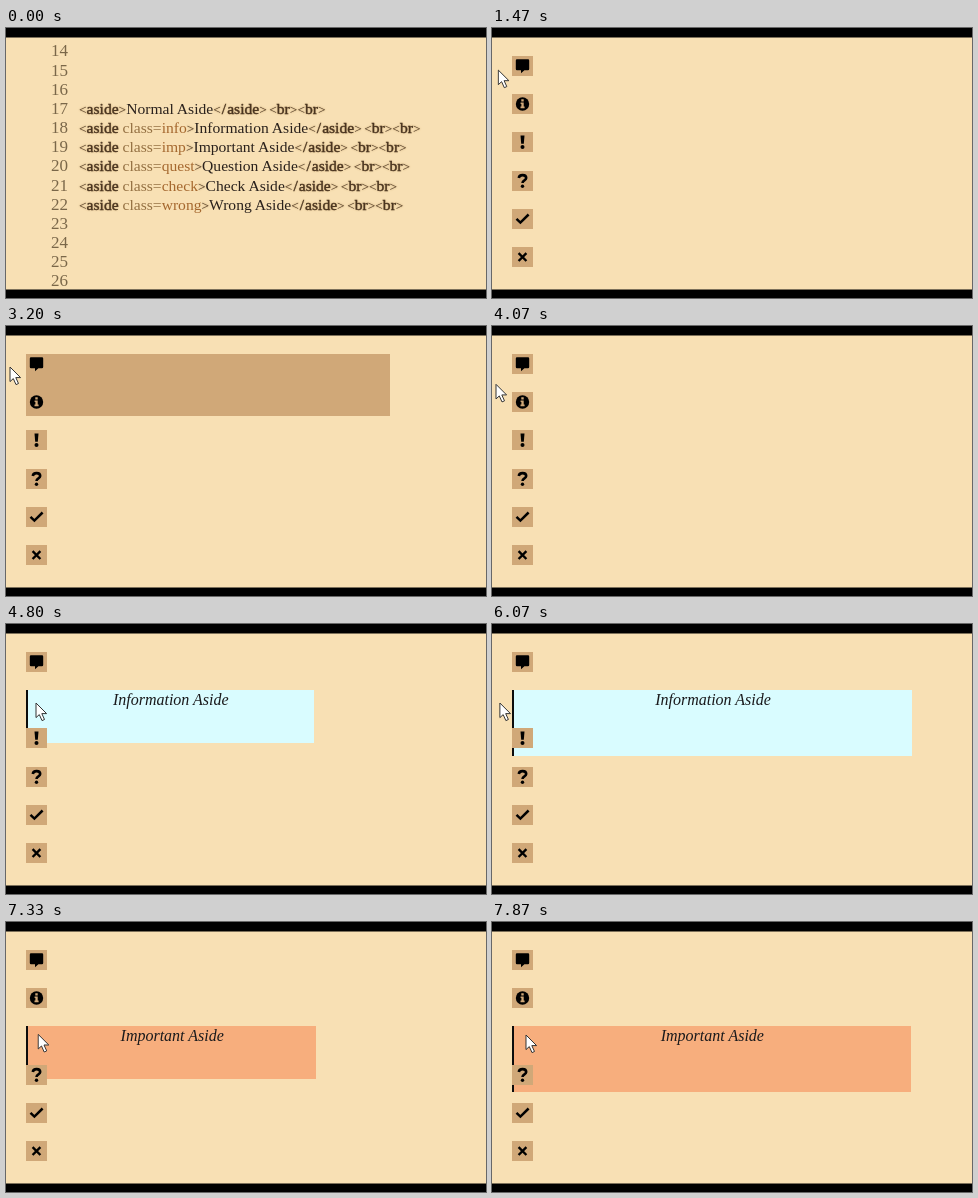
Write an HTML page that moves like this. It is 480 px wide and 270 px high and loops after 8000 ms.

```html
<!DOCTYPE html>
<html lang="en">
<head>
<meta charset="utf-8">
<title>Aside hover demo</title>
<style>
  html, body { margin: 0; width: 100%; height: 100%; overflow: hidden; background: #000; }
  #stage { position: relative; width: 480px; height: 270px; overflow: hidden; background: #000;
    font-family: "Liberation Serif", "Times New Roman", serif; }
  .page { position: absolute; left: 0; top: 10px; width: 480px; height: 251px; overflow: hidden;
    background: #f8e0b4; box-shadow: 0 0 0 1px #7c705a; }
  .page > * { position: absolute; }

  .num { left: 33px; width: 41px; text-align: center; font-size: 17px; line-height: 20px; color: #7a6749; }
  .line { left: 73px; font-size: 15.6px; line-height: 20px; white-space: pre; color: #2a211c; }
  .tag { color: #4a3520; -webkit-text-stroke: .35px #4a3520; text-shadow: 0 0 2px #b08a55; }
  .ang { font-size: 13.4px; -webkit-text-stroke: 0; }
  .slash { margin: 0 1px; }
  .gap { font-size: 10px; }
  .attr { color: #947042; }
  .val { color: #a5682f; }

  .aside { left: 20px; box-sizing: border-box; overflow: hidden; background: #d0a878; }
  .aside svg { position: absolute; left: 0; top: 0; }
  .aside.open { border-left: 2px solid #0c0c0c; }
  .aside.open svg { display: none; }
  .label, .bar { position: absolute; top: 0; display: none; }
  .open .label { display: block; }
  .label { left: 26px; font: italic 16px/20px "Liberation Serif", "Times New Roman", serif;
    text-align: center; overflow-wrap: anywhere; color: #1a1a1c; }
  .bar { right: 0; width: 7px; height: 100%; border-radius: 3px;
    background: repeating-linear-gradient(45deg, #a4744a 0 1px, #cf9a68 1px 2px); }
  .thumb { height: 62%; border-radius: 3px 3px 0 0; background: #ac7b4e; }
  #cursor { position: absolute; left: 0; top: 0; }
</style>
</head>
<body>
<div id="stage">
  <div class="page" id="code"></div>
  <div class="page" id="demo"></div>
  <svg id="cursor" width="14" height="20" viewBox="-1 -1 14 20">
    <path d="M0 0V14.6L3.3 11.6L6 17.6L8.5 16.5L5.8 10.6H10.6Z" fill="#fff" stroke="#333" stroke-width="1" stroke-linejoin="round"/>
  </svg>
</div>
<script>
const LOOP = 8000, STEP = 1000 / 15, CODE_END = 266;
const GROW = 1200, SHRINK = 500;
const PAD = 26, BORDER = 2, BAR = 7;

const asides = [
  { kind: '', name: 'Normal', bg: '#d0a878', from: 1526, to: 3150,
    icon: '<path d="M5 3.3H16Q17.2 3.3 17.2 4.5V13Q17.2 14.2 16 14.2H12.4L9 17.2V14.2H5Q3.8 14.2 3.8 13V4.5Q3.8 3.3 5 3.3Z"/>' },
  { kind: 'info', name: 'Information', bg: '#d9fcff', from: 4302, to: 6090,
    icon: '<circle cx="10.5" cy="10" r="6.7"/><path d="M9.3 5.2H11.7V7.4H9.3ZM8.6 8.5H11.7V12.6H12.6V14.2H8.5V12.6H9.4V10.1H8.6Z" fill="#d0a878"/>' },
  { kind: 'imp', name: 'Important', bg: '#f7ae7d', from: 6762, to: 9000,
    icon: '<path d="M8.5 3.4H12.5L11.8 11.8H9.2Z"/><circle cx="10.5" cy="15" r="2"/>' },
  { kind: 'quest', name: 'Question',
    icon: '<path d="M6.8 7C7.2 3.2 14.2 3.2 14.2 7.1C14.2 9.6 10.5 9.2 10.5 12" fill="none" stroke="#000" stroke-width="2.6"/><circle cx="10.5" cy="15.2" r="1.7"/>' },
  { kind: 'check', name: 'Check',
    icon: '<path d="M4.5 9.8L8.4 13.6L16.6 5.5" fill="none" stroke="#000" stroke-width="2.5"/>' },
  { kind: 'wrong', name: 'Wrong',
    icon: '<path d="M6.6 6.2L14.4 14M14.4 6.2L6.6 14" fill="none" stroke="#000" stroke-width="2.4"/>' }
];

// Pointer tip: time, x, y
const path = [
  [0, -40, 42], [1460, -40, 42], [1461, 5, 42], [1526, 20, 43], [1800, 28, 42],
  [3060, 28, 42], [3140, 12, 42], [3200, 4, 41], [3900, 4, 50], [4100, 4, 60],
  [4300, 21, 74], [4800, 30, 79], [5730, 29, 79], [6066, 8, 79], [6200, -16, 82],
  [6590, -16, 90], [6591, 24, 106], [6867, 31, 112], [7867, 34, 113], [8000, 34, 113]
];

const $ = id => document.getElementById(id);

function add(parent, cls, html, top) {
  const el = document.createElement('div');
  el.className = cls;
  el.innerHTML = html;
  el.style.top = top + 'px';
  return parent.appendChild(el);
}

const span = (cls, text) => `<span class="${cls}">${text}</span>`;
const lt = span('ang', '&lt;'), gt = span('ang', '&gt;');
const tag = text => span('tag', lt + text + gt);

function codeLine({ kind, name }) {
  const attr = kind ? span('attr', ' class=') + span('val', kind) : '';
  return span('tag', lt + 'aside') + attr + span('tag', gt) + name + ' Aside' +
    tag(span('slash', '/') + 'aside') + span('gap', ' ') + tag('br') + tag('br');
}

for (let i = 0; i < 13; i++) {
  const top = 3.4 + 19.17 * i;
  add($('code'), 'num', 14 + i, top);
  const item = asides[i - 3];
  if (item) add($('code'), 'line', codeLine(item), top);
}

asides.forEach((a, i) => {
  a.el = add($('demo'), 'aside',
    `<svg width="21" height="20">${a.icon}</svg><div class="label">${a.name} Aside</div><div class="bar"><div class="thumb"></div></div>`,
    Math.round(17.7 + 38.3 * i));
  a.label = a.el.querySelector('.label');
  a.bar = a.el.querySelector('.bar');
});

// The CSS "ease" curve
function ease(x) {
  if (x <= 0) return 0;
  if (x >= 1) return 1;
  const curve = (a, b, s) => 3 * a * s * (1 - s) ** 2 + 3 * b * s * s * (1 - s) + s ** 3;
  let lo = 0, hi = 1;
  for (let i = 0; i < 24; i++) {
    const mid = (lo + hi) / 2;
    if (curve(.25, .25, mid) < x) lo = mid; else hi = mid;
  }
  return curve(.1, 1, lo);
}

function poseAside(a, t) {
  const open = t >= a.from && t < a.to;
  const p = open ? ease((t - a.from) / GROW)
    : t >= a.to ? 1 - ease((t - a.to) / SHRINK) : 0;
  const h = 20 + 46.4 * p;
  let w = 21 + 379 * p;
  if (open) w = Math.max(w, 53);
  a.el.classList.toggle('open', open);
  a.el.style.background = open ? a.bg : '#d0a878';
  a.el.style.width = Math.round(w) + 'px';
  a.el.style.height = Math.round(h) + 'px';
  a.bar.style.display = 'none';
  if (!open) return;
  const room = w - BORDER - 2 * PAD;
  a.label.style.width = Math.max(0, room) + 'px';
  if (a.label.offsetHeight > h) {
    a.label.style.width = Math.max(0, room - BAR) + 'px';
    a.bar.style.display = 'block';
  }
}

function poseCursor(t) {
  let i = 1;
  while (i < path.length - 1 && path[i][0] < t) i++;
  const [t0, x0, y0] = path[i - 1], [t1, x1, y1] = path[i];
  const k = (t - t0) / (t1 - t0);
  const x = x0 + (x1 - x0) * k - 1, y = y0 + (y1 - y0) * k - 1;
  $('cursor').style.transform = `translate(${x}px, ${y}px)`;
}

function draw(now) {
  const t = Math.floor((now % LOOP + 1) / STEP) * STEP;
  $('demo').style.visibility = t < CODE_END ? 'hidden' : 'visible';
  asides.forEach(a => poseAside(a, t));
  poseCursor(t);
}

const start = performance.now();
function tick() {
  draw(performance.now() - start);
  requestAnimationFrame(tick);
}
tick();
</script>
</body>
</html>
```
